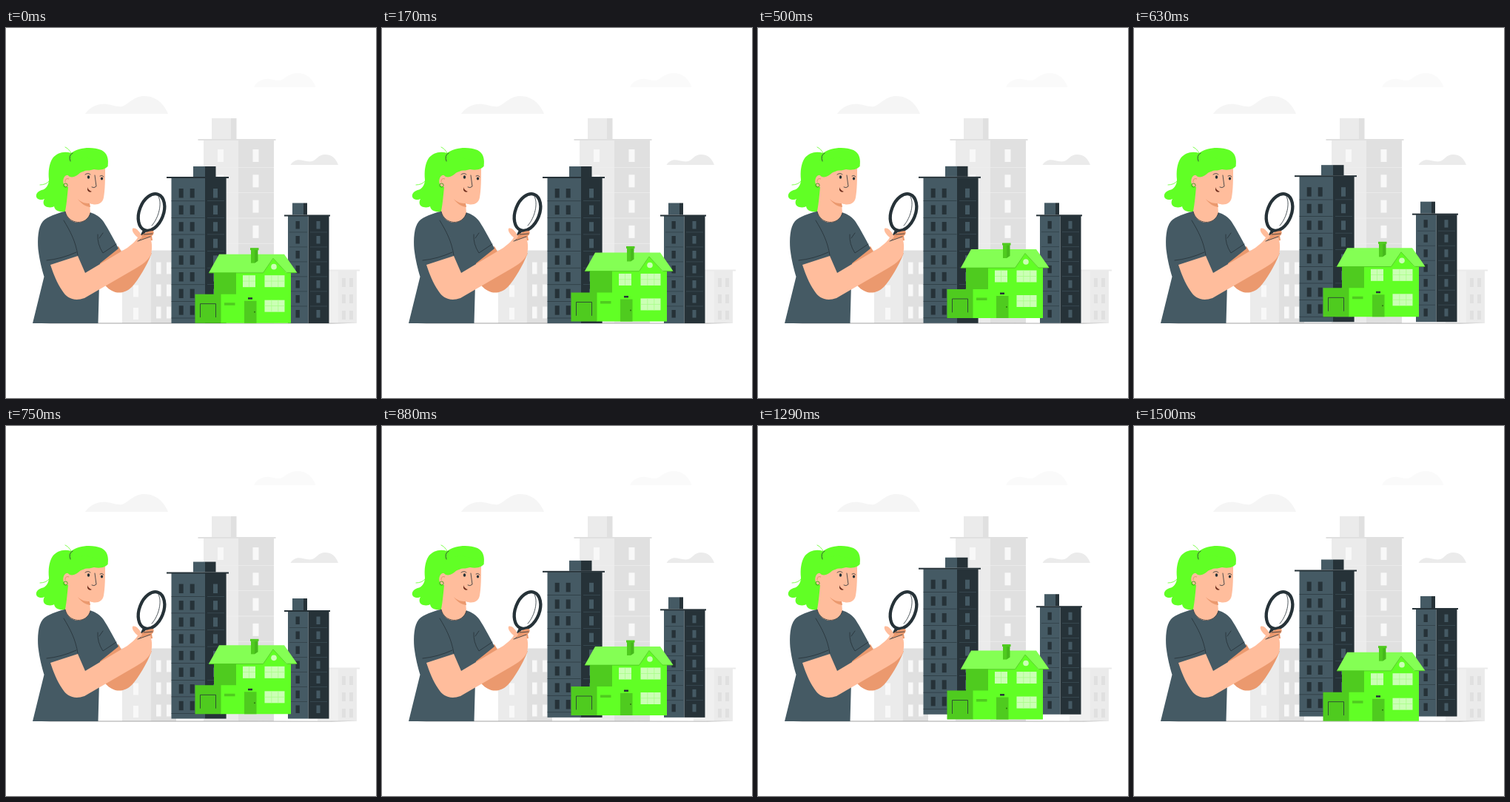
Write an HTML page that moves like this. It is 500 px wide and 500 px high and loops after 1540 ms.

```html
<!DOCTYPE html>
<html lang="en">
<head>
<meta charset="utf-8">
<title>House search</title>
<style>
  html, body { margin: 0; width: 100%; height: 100%; overflow: hidden; background: #fff; }
  svg { display: block; width: 100%; height: 100%; }
  .line { fill: none; stroke: #263238; stroke-width: .8; stroke-linecap: round; stroke-linejoin: round; }
  .strand { stroke: #61ff25; }
</style>
</head>
<body>
<svg viewBox="0 0 500 500">
  <path fill="#f5f5f5" d="M107 116C112 108 124 101 136 103C145 104 150 107 157 106C166 103 172 92 187 92C203 92 214 103 219 116Z"/>
  <path fill="#fafafa" d="M335 80C338 73 347 68 356 69C363 70 368 72 373 70C379 66 384 61 395 61C407 61 415 70 418.500 80Z"/>
  <path fill="#ebebeb" d="M384.500 185C388 179 394 177 401 179C406 180 410 181 414 180C420 178 422 171 431 171C441 171 446 177 449 185Z"/>
  <g id="skyline"></g>
  <path fill="#a3a3a3" d="M36 398.400H300L474 398.800L440 399.600H60Z"/>
  <g id="towers"></g>

  <g id="house">
    <path fill="#61ff25" d="M290 331H385V399H290Z"/>
    <path fill="#4fcb1f" d="M281 330H311V360H281ZM255.500 360H290.500V399H255.500Z"/>
    <path class="line" d="M262.500 391V373H283.500V391"/>
    <path fill="#84ff54" d="M288 306H376L393.500 331H274Z"/>
    <path fill="#61ff25" d="M347 332L361.500 312L379 332Z"/>
    <path fill="none" stroke="#4fcb1f" stroke-width=".9" d="M274 331.200H347.500L361 311.500"/>
    <path fill="none" stroke="#4fcb1f" stroke-width=".8" d="M361 311.500L379 331H393"/>
    <circle cx="362" cy="323" r="3.800" fill="#cbffb5"/>
    <path fill="#4fcb1f" d="M331 300H336V318H331Z"/>
    <path fill="#46b91c" d="M336 300H340.500V315L336 318Z"/>
    <path fill="#4fcb1f" d="M330 297.500H341.500V300.500H330Z"/>
    <g id="panes"></g>
    <path fill="#4fcb1f" d="M322 369H338.500V399H322ZM295 371.500H309.500V375H295Z"/>
    <circle cx="336" cy="384" r="1" fill="#2c7411"/>
    <path fill="#263238" d="M327 364.500H333V367H327Z"/>
  </g>

  <g id="woman">
    <path fill="#eb996e" d="M126 312L152 295L165 318L197 304C190 322 179 340 170 350C161 359 150 359 143 355C137 352 133 347 130 342Z"/>
    <path fill="#455a64" d="M80 247.500C68 251 56 255 50 261C43 269 42.500 286 43.500 299C45.500 315 48.500 326 51.500 336L36 399H124.500L126 345L127 318L152 298C146 286 139 273 132 262C128 256 121 251 113 249C109 267 85 268 80 247.500Z"/>
    <path fill="#61ff25" d="M88 169C79 166 69 168 63 176C58 184 57 194 58 205C58 212 54 218 48 219C42 221 39 226 42 230C45 233 50 232 52 231C49 236 51 241 56 242C60 243 64 242 65 241C66 247 72 249 80 248L92 218L106 198L129 192L137.500 187C139 177 137 169 129 165C117 160 98 161 88 169Z"/>
    <path fill="#ffbd9c" d="M88 197C98 200 106 189 134 188C134 204 134 218 132 229C130 239 121 240 113 237L114 250C109 268 84 267 80 248C82 237 83 225 84 215C78 215 76 208 78 203C80 198 84 198 87 200Z"/>
    <path fill="#61ff25" d="M82 197C86 203 91 202 96 199C102 195 104 191 106 188C104 194 113 193 119 191C129 193 136 190 137.500 186L134 180L105 175L86 180Z"/>
    <path fill="#eb996e" d="M97 231C102 236 107 237 113 237L114 242C107 241 101 237 97 231Z"/>
    <path class="line" d="M87 180Q84 172 90 169M120 199L122 214Q119 217 116 215M107 198Q111 195 114 198M127 200Q130 198 132 201M80 248C84 266 109 268 114 250"/>
    <path class="line strand" d="M88 169Q85 163 80 161M58 207Q54 212 46 212"/>
    <g fill="#263238">
      <ellipse cx="111.500" cy="201.500" rx="1.700" ry="2.200"/>
      <ellipse cx="129.500" cy="203.500" rx="1.600" ry="2.100"/>
      <path fill="#71301f" d="M110 215Q111 219 116 221Q112 223 110 219Z"/>
    </g>
    <path fill="none" stroke="#d98a63" stroke-width=".8" d="M85 204Q80 202 80 208"/>
    <circle cx="80.500" cy="212.500" r="2.600" fill="none" stroke="#3c9c19" stroke-width=".9"/>
    <path class="line" d="M78 260C87 275 94 288 97 307M55 314Q75 312 95 303M124 279Q123 292 131 304L149 292M126 284L131 277"/>

    <ellipse cx="196.500" cy="249" rx="16.300" ry="25.800" transform="rotate(21 196.500 249)" fill="#fff" stroke="#263238" stroke-width="4.300"/>
    <path class="line" d="M206 228C211 236 207 256 197 267"/>
    <path fill="none" stroke="#263238" stroke-width="4.500" stroke-linecap="round" d="M187 274L181 287"/>
    <path fill="#eb996e" d="M182 281Q190 274 199 274Q201 278 197 281L198 287L181 289Z"/>
    <path fill="#ffbd9c" d="M60 320L97 308L107 331L164 297C172 291 176 287 178 283C172 278 170 274 171 271C175 269 180 274 184 282L180 287L195 282L196 287C198 294 197 301 196 306C192 314 184 320 175 325L106 365C92 370 82 365 76 355C69 345 64 332 60 320Z"/>
    <path class="line" d="M178 288L195 282M186 279L198 278"/>
  </g>
</svg>
<script>
const $ = id => document.getElementById(id);
const rect = (x, y, w, h, fill) => `<rect x="${x}" y="${y}" width="${w}" height="${h}" fill="${fill}"/>`;

// Equal rows of windows, one column for each x
const windows = (xs, y, step, rows, w, h, fill) =>
  xs.map(x => Array.from({ length: rows }, (_, i) => rect(x, y + i * step, w, h, fill)).join('')).join('');

// Two-faced block with a flat eave
const block = (left, mid, right, top, light, dark, eaveLeft, eaveRight) =>
  rect(left, top, mid - left, 399 - top, light) +
  rect(mid, top, right - mid, 399 - top, dark) +
  rect(eaveLeft, top - 1.5, eaveRight - eaveLeft, 2, dark);

const pale = '#ebebeb', grey = '#e0e0e0', white = '#f8f8f8';
const slate = '#455a64', ink = '#263238';

$('skyline').innerHTML =
  rect(278, 122, 26, 28, pale) + rect(304, 122, 7.5, 28, grey) +
  block(267, 314, 362, 151.5, pale, grey, 259.5, 364.5) +
  windows([286], 164, 34.3, 2, 8, 17, white) +
  windows([333.5], 164, 34.3, 5, 8, 17, white) +
  windows([267], 188, 34.3, 6, 95, .7, '#f0f0f0') +
  block(157, 195.5, 230, 302, pale, grey, 150, 230) +
  windows([172], 317, 30.5, 3, 7, 16, white) +
  windows([203, 217], 316.5, 30, 3, 6.5, 16, white) +
  block(421, 449, 474, 328, '#f0f0f0', pale, 421, 478) +
  windows([454, 464], 338, 22, 3, 5, 12, grey);

$('towers').innerHTML =
  rect(253, 187, 16, 14, slate) + rect(269, 187, 14.5, 14, ink) +
  block(223.5, 269, 297.6, 202.5, slate, ink, 217, 301) +
  windows([233.7, 248.7], 217, 22.6, 8, 6, 12.5, ink) +
  windows([280], 217, 22.6, 8, 6, 12.5, slate) +
  windows([223.5], 233.5, 22.6, 8, 45, .6, ink) +
  windows([272], 233.5, 22.6, 8, 23, .5, slate) +
  rect(387, 236.5, 15, 16, slate) + rect(402, 236.5, 5, 16, ink) +
  block(381, 408.5, 436.5, 254, slate, ink, 376, 438) +
  windows([391.5], 261, 20, 7, 5.3, 10.5, ink) +
  windows([419.5], 261, 20, 7, 5, 10.5, slate) +
  windows([383], 275.7, 20, 6, 24, .5, ink) +
  windows([411], 275.7, 20, 6, 23, .5, slate);

// House window with its glazing bars
const pane = (x, y, w, bars) =>
  rect(x, y, w, 16, '#cbffb5') + rect(x, y + 7.5, w, .7, '#a4ff82') +
  bars.map(b => rect(x + b, y, .7, 16, '#a4ff82')).join('');

$('panes').innerHTML = pane(320, 334.5, 17, [8.3]) +
  pane(349.5, 334.5, 27, [9, 18]) + pane(349.5, 368, 27, [9, 18]);

const LOOP = 1540, FPS = 24, PERIOD = 1500;

// Linear rise of 10 px and fall back within one period
const lift = ms => ms < 0 ? 0 : 10 * (Math.abs(2 * (ms % PERIOD) / PERIOD - 1) - 1);
const shift = (id, y) => $(id).setAttribute('transform', `translate(0 ${y})`);

function draw(now) {
  const t = Math.floor((now % LOOP + 5) * FPS / 1000) * 1000 / FPS;
  shift('house', lift(t + 25));
  shift('towers', lift(t - 488));
  requestAnimationFrame(draw);
}
draw(performance.now());
</script>
</body>
</html>
```
